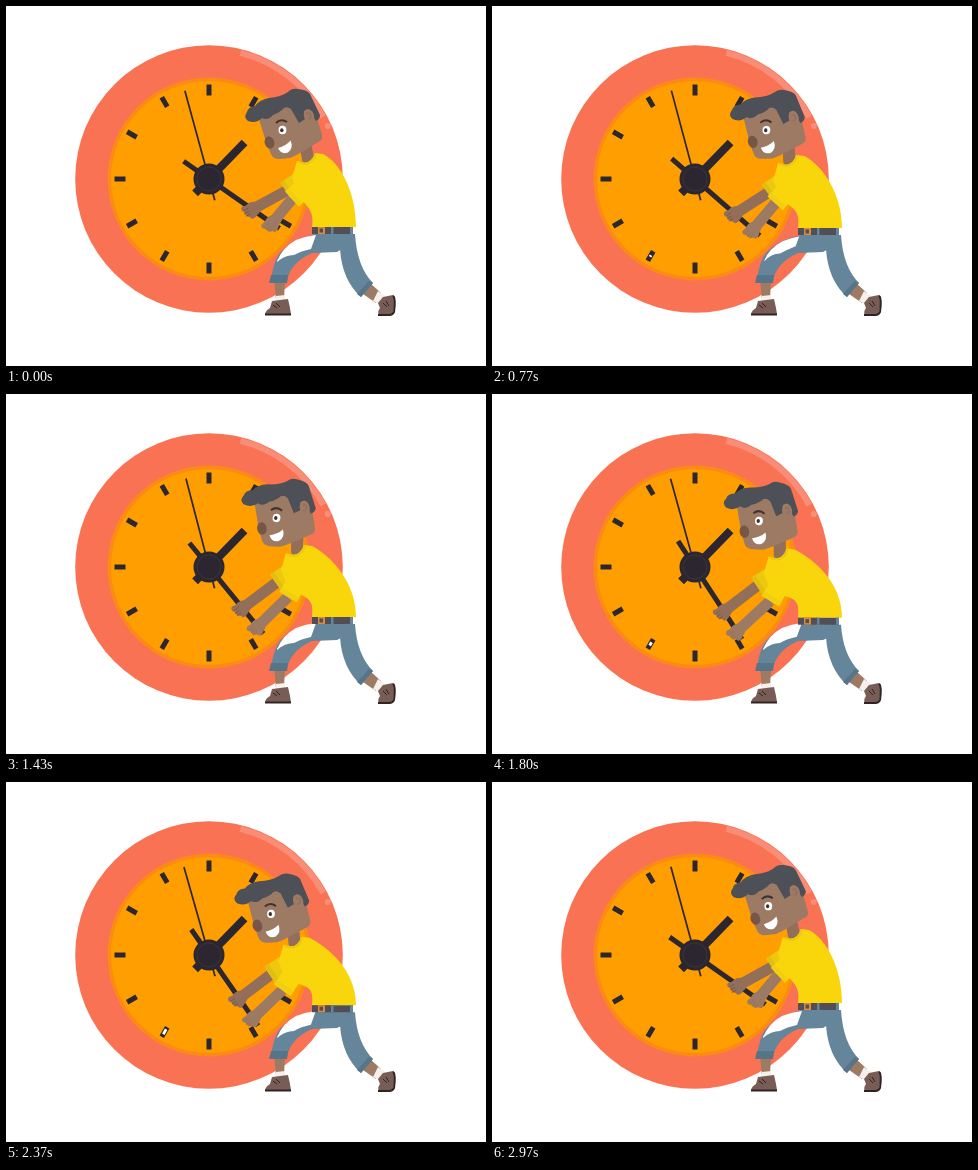
An HTML page with a canvas for the animation above (3 s loop, 480 px wide and 360 px high).

```html
<!DOCTYPE html>
<html lang="en">
<head>
<meta charset="utf-8">
<title>Pushing the clock</title>
<style>
html, body { margin: 0; width: 100%; height: 100%; overflow: hidden; background: #fff; }
canvas { display: block; }
</style>
</head>
<body>
<canvas id="stage" width="480" height="360"></canvas>
<script>
const ctx = document.getElementById('stage').getContext('2d');
const LOOP = 3000, RAD = Math.PI / 180;
const CX = 203, CY = 173;
const SKIN = '#9d7a63', SKIN_DARK = '#936f5a', HAIR = '#4e5057', NOSE = '#765646';
const SHIRT = '#f9d60b', SHIRT_DARK = '#ecc90f', PANTS = '#65859a', PANTS_DARK = '#567589';
const INK = '#2b2630', SHOE = '#785d57', SOLE = '#2f2423', SOCK = '#f6efea';

const times = [0, 470, 1070, 1430, 2140, 2600, 3000];
const pose = {
  minute: [35, 38, 45, 50.8, 60, 47],
  second: [15.3, 15.9, 14, 14.6, 16, 15.7],
  eyeX: [277, 276, 273.5, 271, 265.5, 265.5],
  eyeY: [124, 124.3, 124, 124, 130.7, 132.5],
  tilt: [0, 2, 5, 8, 7, -1],
  neckX: [302, 300, 294, 291, 286, 293],
  neckY: [152, 153, 155, 156, 162, 156],
  nearX: [286, 285, 282, 282, 275, 279],
  nearY: [193, 195, 200, 203, 209, 206],
  farX: [280, 278, 273, 270, 262, 268],
  farY: [185, 186, 188, 189, 194, 191],
  hip: [0, 0.5, 1.5, 2, 3, 1],
  gap: [1, 1, 0.3, 1, 0.95, 1],
  glint: [0, 0, 0.5, 0, 1, 0.5]
};

// Smooth cyclic interpolation that never overshoots its keys
function sample(v, t) {
  const n = v.length;
  const rate = i => {
    const k = (i + n) % n;
    return (v[(k + 1) % n] - v[k]) / (times[k + 1] - times[k]);
  };
  const slope = i => {
    const a = rate(i - 1), b = rate(i);
    return a * b <= 0 ? 0 : 2 * a * b / (a + b);
  };
  let i = 0;
  while (i < n - 1 && t >= times[i + 1]) i++;
  const d = times[i + 1] - times[i], u = (t - times[i]) / d;
  const u2 = u * u, u3 = u2 * u;
  return (2 * u3 - 3 * u2 + 1) * v[i] + (u3 - 2 * u2 + u) * d * slope(i) +
    (3 * u2 - 2 * u3) * v[(i + 1) % n] + (u3 - u2) * d * slope(i + 1);
}

function shape(d, color) {
  ctx.fillStyle = color;
  ctx.fill(new Path2D(d));
}

function curve(d, color, width) {
  ctx.strokeStyle = color;
  ctx.lineWidth = width;
  ctx.lineCap = 'butt';
  ctx.stroke(new Path2D(d));
}

function line(a, b, width, color, cap = 'butt') {
  ctx.strokeStyle = color;
  ctx.lineWidth = width;
  ctx.lineCap = cap;
  ctx.beginPath();
  ctx.moveTo(...a);
  ctx.lineTo(...b);
  ctx.stroke();
}

function oval(x, y, rx, ry, color, angle = 0) {
  ctx.fillStyle = color;
  ctx.beginPath();
  ctx.ellipse(x, y, rx, ry, angle * RAD, 0, Math.PI * 2);
  ctx.fill();
}

const polar = (deg, r) => [CX + r * Math.cos(deg * RAD), CY + r * Math.sin(deg * RAD)];
const mix = (a, b, u) => [a[0] + (b[0] - a[0]) * u, a[1] + (b[1] - a[1]) * u];

function hand(deg, tail, tip, width) {
  line(polar(deg, -tail), polar(deg, tip), width, INK);
}

function clock(p) {
  oval(CX, CY, 133.8, 133.8, '#f97253');
  ctx.strokeStyle = '#fa8d78';
  ctx.lineWidth = 6;
  ctx.lineCap = 'butt';
  ctx.beginPath();
  ctx.arc(CX, CY, 130, -76 * RAD, -28.5 * RAD);
  ctx.stroke();
  oval(...polar(-24, 130), 3, 3, '#fa8d78');
  oval(CX, CY, 101.5, 101.5, '#fb8b14');
  oval(CX, CY, 98, 98, '#ff9e00');
  for (let a = 0; a < 360; a += 30) line(polar(a, 83.5), polar(a, 94.5), 5, INK);
  if (p.glint > 0.1) line(polar(120, 89 - 4 * p.glint), polar(120, 89 + 3 * p.glint), 2.8, '#fff');
  hand(-45.8, 20, 51, 8);
  hand(p.minute, 31, 86, 5);
  hand(-90 - p.second, 22, 91.5, 1.7);
  oval(CX, CY, 15.5, 15.5, INK);
  ctx.strokeStyle = '#3b343c';
  ctx.lineWidth = 1;
  ctx.beginPath();
  ctx.arc(CX, CY, 12, 0, Math.PI * 2);
  ctx.stroke();
}

function legs(p) {
  const y = 228 + p.hip;
  // back leg
  shape('M364 277L375 287L370 297L357 288Z', SKIN);
  shape('M372 285L379 290L375 299L367 295Z', SOCK);
  shape(`M331 ${y}L349 ${y}Q351 261 367 277L355 291Q336 274 334 243Z`, PANTS);
  shape('M363 275L367 277L355 291L351 288Z', PANTS_DARK);
  shape('M377 291L387 289Q390 290 389 294L387 307Q386 310 381 310L373 309Q371 306 374 302L372 297Z', SHOE);
  curve('M387 290Q390 292 388 306Q387 309 383 309L372 309', SOLE, 2);
  curve('M377 297L381 301M380 295L383 300', SOLE, 1);
  // front leg
  shape('M268 273L279 273L278 294L270 294Z', SKIN);
  shape('M270 290L279 289L279 296L270 296Z', SOCK);
  shape(`M347 ${y - 1}L310 ${y}Q287 233 274 247Q267 256 265 275L281 275Q284 257 306 247L331 246L347 ${y + 8}Z`, PANTS);
  shape('M265 269L282 269L281 277L263 277Z', PANTS_DARK);
  const d = 4 * (1 - p.gap);
  shape(`M${271 + d} ${255 - d / 2}Q277 ${241 + d} 290 ${234 + d}Q300 ${230 + d} ${310 - 2 * d} ${229 + d}` +
    `L${305 - d} ${243 - 2 * d}Q295 ${245 - d} 288 ${249 - d}Q279 ${249 - d} ${271 + d} ${256 - d / 2}Z`, '#fff');
  shape('M266 295L282 293Q284 301 285 308L259 308Q260 304 264 302Z', SHOE);
  line([259, 308.5], [285, 308.5], 2, SOLE);
  curve('M267 299L271 302M270 297L274 301', SOLE, 1);
}

function belt(p) {
  const y = 224.5 + p.hip;
  line([306, y], [347, y], 7, '#514e58');
  line([312, y], [319, y], 7, '#d98a3d');
  line([313.5, y], [317, y], 4, '#514e58');
  line([325, y], [327.5, y], 7, PANTS);
  line([344, y], [347, y], 7, PANTS);
}

function arm(shoulder, cuff, grip, near) {
  const skin = near ? SKIN : SKIN_DARK, cloth = near ? SHIRT : SHIRT_DARK;
  line(cuff, grip, 11, skin);
  const a = Math.atan2(grip[1] - cuff[1], grip[0] - cuff[0]) / RAD;
  oval(grip[0], grip[1], 9, 7.2, skin, a);
  ctx.save();
  ctx.translate(...grip);
  ctx.rotate(a * RAD);
  oval(1, -5, 5, 3, skin, -25);
  oval(6, 4, 4, 3, skin, 20);
  curve('M4 -3L9 -3M4 0L9 0M3 3L8 3', near ? SKIN_DARK : NOSE, 0.8);
  ctx.restore();
  line(shoulder, cuff, 20, cloth);
  line(mix(cuff, shoulder, 0.16), cuff, 20.5, near ? '#f1cf10' : '#e2be13');
}

function shirt(p) {
  const x = p.neckX, y = p.neckY, b = 221 + p.hip;
  shape(`M${x - 11} ${y + 3}Q${x + 2} ${y + 9} ${x + 7} ${y - 5}L${x + 15} ${y - 4}` +
    `C${x + 34} ${y + 6} 350 188 350 ${b}L306 ${b}` +
    `C308 207 304 203 ${x - 8} ${y + 40}L${x - 16} ${y + 20}Z`, SHIRT);
  curve(`M${x - 10} ${y + 4}Q${x + 3} ${y + 10} ${x + 8} ${y - 4}`, SHIRT_DARK, 2.2);
}

function head(p, blink) {
  ctx.save();
  ctx.translate(p.eyeX, p.eyeY);
  ctx.rotate(p.tilt * RAD);
  ctx.translate(-277, -124);
  shape('M252 110L260 136L265 148Q267 153 273 153L284 152Q288 151 314 135Q317 133 316 129L307 98L285 92Z', SKIN);
  oval(263.5, 136.5, 4.8, 6.2, NOSE, -18);
  shape('M242 115Q237 111 241 106Q242 101 249 100Q253 94 263 92Q275 91 282 86Q286 82 292 83' +
    'Q302 84 304 88L314 109Q314 113 310 115L302 103L298 105L299 113L293 117L285 103' +
    'Q279 99 276 104Q271 108 267 109Q262 115 256 112Q250 118 242 115Z', HAIR);
  oval(303, 110, 5, 7, SKIN, -18);
  curve('M301 108Q304 105 305 110Q305 113 302 113', SKIN_DARK, 1.2);
  curve('M270 117Q275 112 281 116', '#3c3433', 2);
  if (blink) {
    curve('M272 124Q277 127 282 122', SKIN_DARK, 1.3);
  } else {
    oval(276.5, 124, 3.9, 4.2, '#fff');
    oval(275.8, 124.2, 1.7, 2, '#3c3433');
  }
  shape('M272 142Q280 140 284.5 134.5Q288 142 282 146.5Q275 149 272 142Z', '#fff');
  ctx.restore();
}

function draw(now) {
  const t = now % LOOP, p = {};
  for (const k in pose) p[k] = sample(pose[k], t);
  ctx.fillStyle = '#fff';
  ctx.fillRect(0, 0, 480, 360);
  clock(p);
  legs(p);
  const top = [p.neckX + 7, p.neckY + 20];
  arm([top[0] - 6, top[1] - 3], [p.farX, p.farY], polar(p.minute, 53), false);
  const tilt = p.tilt * RAD, c = Math.cos(tilt), s = Math.sin(tilt);
  const nape = [p.eyeX + 23 * c - 18 * s, p.eyeY + 23 * s + 18 * c];
  line(nape, [p.neckX, p.neckY + 1], 12, SKIN_DARK, 'round');
  shirt(p);
  belt(p);
  arm(top, [p.nearX, p.nearY], polar(p.minute, 77), true);
  head(p, t > 1000 && t < 1140);
}

let start;
function tick(now) {
  if (start === undefined) start = now;
  draw(now - start);
  requestAnimationFrame(tick);
}
draw(0);
requestAnimationFrame(tick);
</script>
</body>
</html>
```
